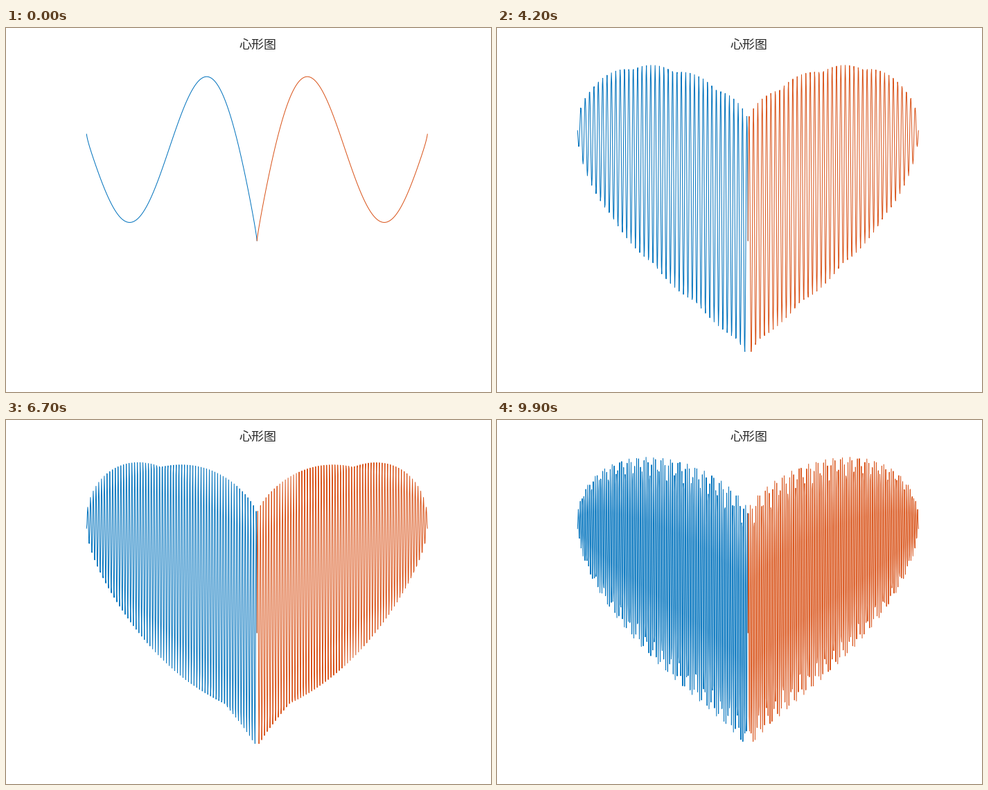
These frames come from a looping animation (700x525 px, 10 s). A matplotlib script:

```python
import numpy as np
import matplotlib.pyplot as plt
from matplotlib.animation import FuncAnimation

plt.rcParams["path.simplify"] = False

W, H, DPI = 700, 525, 100
FRAMES, INTERVAL = 100, 100
BLUE, ORANGE = "#0072BD", "#D95319"
PX = 72 / DPI  # one pixel in points

# The coarse, fixed sampling step gives the moire of the dense waves.
STEP = np.pi / 750
x = np.arange(0, np.sqrt(3.3), STEP)
base = x ** (2 / 3)
envelope = 0.9 * np.sqrt(3.3 - x ** 2)


def heart(a):
    """Right half of the heart, filled by a sine of frequency a."""
    return base + envelope * np.sin(a * np.pi * x)


fig = plt.figure(figsize=(W / DPI, H / DPI), dpi=DPI, facecolor="white")
ax = fig.add_axes([0.13, 0.11, 0.775, 0.815])
ax.set_xlim(-2, 2)
ax.set_ylim(-1.5, 2.5)
ax.axis("off")

fig.text(363.5 / W, 1 - 24.5 / H, "心形图", family="Noto Sans CJK JP",
         size=18 * PX, color="#262626", ha="center", va="center")

halves = [
    ax.plot(side * x, heart(1), color=color, lw=PX, solid_joinstyle="round")[0]
    for side, color in ((-1, BLUE), (1, ORANGE))
]


def update(i):
    y = heart(i + 1)
    for line in halves:
        line.set_ydata(y)
    return halves


anim = FuncAnimation(fig, update, frames=FRAMES, interval=INTERVAL,
                     repeat=True, repeat_delay=0, blit=False)
plt.show()
```
